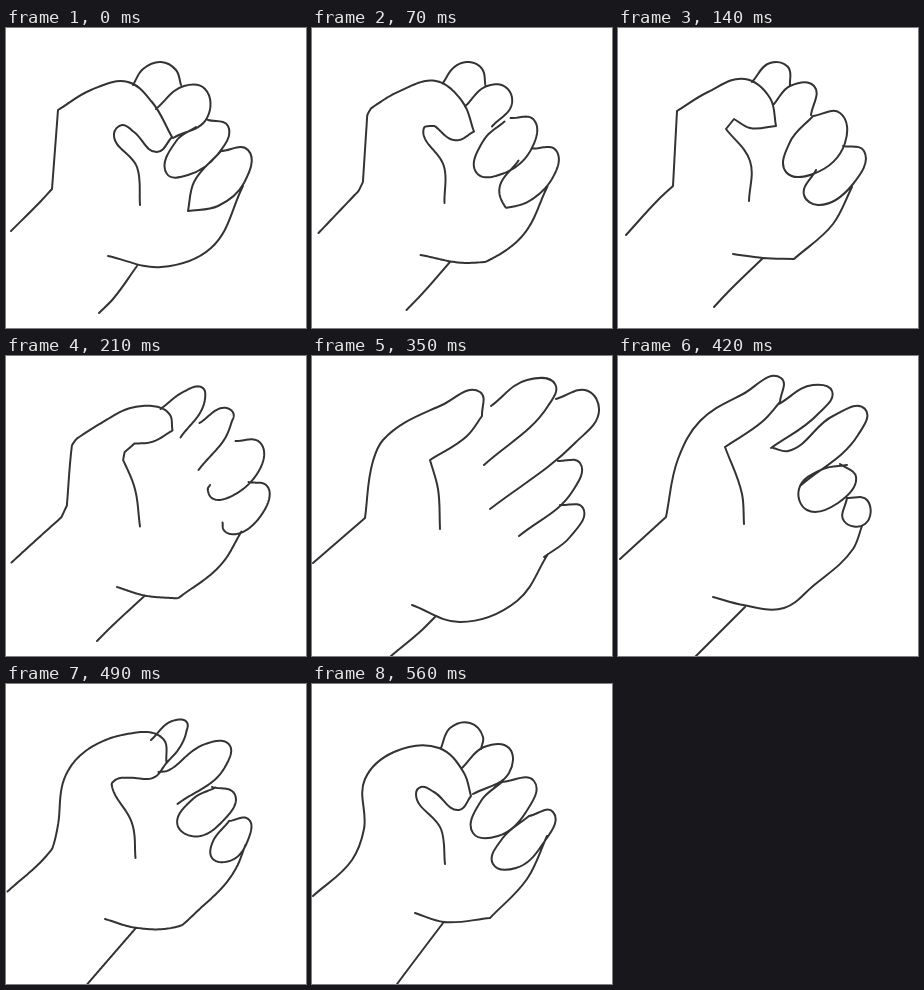
Write an HTML page that moves like this. It is 300 px wide and 300 px high and loops after 630 ms.

```html
<!DOCTYPE html>
<html lang="en">
<head>
<meta charset="utf-8">
<title>Hand closing and opening</title>
<style>
  html, body { margin: 0; height: 100%; overflow: hidden; background: #fff; }
  svg { display: block; width: 100vw; height: 100vh; }
  path { fill: none; stroke: #333; stroke-width: 2; stroke-linecap: round; stroke-linejoin: round; }
</style>
</head>
<body>
<svg viewBox="0 0 300 300"><path id="hand"/></svg>
<script>
const STEP = 70;
const SAMPLES = 120;
const hand = document.getElementById('hand');

// One stroke per line: back of hand and thumb, crease, four fingers, palm, forearm.
// "!" marks a sharp corner.
const fist = `
  5,203 35,173 46,161! 52,82! 85,62 122,54 146,74 166,109
  166,109 151,124 128,104 116,97 108,106 131,139 134,177
  127,57 137,41 155,34 170,42 175,57
  150,81 178,58 199,61 201,90 167,110
  202,92 222,98 212,126 182,147 161,146 171,112 190,99
  215,123 242,122 238,155 212,178 182,183! 188,154 215,123
  102,228 155,239 205,220 237,158
  131,238 107,271 93,285`;

const loosening = `
  8,207 40,172 55,158! 59,83! 90,64 127,51 152,70 158,98
  158,98 132,100 116,91! 108,101! 132,133 131,173
  134,54 152,35 170,39 172,58
  156,76 172,58 196,58 193,87
  195,88 222,85 227,115 195,146 168,144 172,114 195,88
  225,118 246,123 235,156 200,177 186,167 198,142
  115,226 145,230 176,231! 215,196 234,159
  145,230 110,264 96,279`;

const open = `
  3,206 45,174 66,155! 72,100 75,87! 130,52 172,36 175,51
  175,51 160,70 118,98! 121,115 137,168
  175,52 210,31 240,28 238,49 177,105
  231,58 268,42 280,55 264,80 192,141
  264,82 286,89 276,116 213,170
  260,134 279,139 268,174 235,191
  107,236 133,249 168,254! 215,222 237,192
  133,249 100,278 86,291`;

const spread = `
  1,207 53,162! 61,105 71,84 130,49 168,36 170,60
  170,60 155,80 118,104! 126,133 128,173
  179,50 215,24 243,28 236,50 172,109
  244,43 276,35 287,55 263,87 178,153
  246,105 268,107 260,136 207,180
  248,149 271,152 258,181 232,201
  100,249 148,266 205,245 236,198
  123,261 110,274 79,300`;

const curling = `
  2,203 48,161! 60,103 82,65 125,38 163,22 162,46
  162,46 145,65 107,91! 124,138 126,168
  161,48 195,29 214,35 200,58 153,92
  155,92 170,95 215,60 247,53 240,79 182,130
  222,108 238,121 220,147 189,154 181,133 205,113 229,109
  229,142 249,144 247,168 226,165 229,142
  95,241 125,249 166,252 195,230 235,193 244,170
  127,251 95,283 77,301`;

const closing = `
  1,212 40,176 52,145 53,95 82,68 127,64 152,89 159,112
  159,112 147,126 122,108 109,103 104,110 129,145 133,180
  129,64 138,44 158,39 171,53 169,65
  150,84 172,63 197,64 197,89 161,110
  190,98 222,97 214,128 186,152 161,149 169,117 190,98
  217,132 241,128 230,161 204,184 181,180 190,155 217,132
  103,229 132,238 178,234! 215,195 235,152
  131,239 100,280 85,300
  182,104 184,102`;

// Smooth curve through the points; the tangent at each bisects its two neighbouring chords.
function smooth(line) {
  const points = line.trim().split(' ').flatMap(pair => {
    const point = pair.replace('!', '').split(',').map(Number);
    return pair.endsWith('!') ? [point, point] : [point];
  });
  const at = i => points[Math.max(0, Math.min(points.length - 1, i))];
  const span = (a, b) => Math.hypot(b[0] - a[0], b[1] - a[1]);
  const unit = (a, b) => a.map((v, k) => (b[k] - v) / (span(a, b) || 1));
  const tangent = i => {
    const into = unit(at(i - 1), at(i)), out = unit(at(i), at(i + 1));
    return unit([0, 0], into.map((v, k) => v + out[k]));
  };
  let d = 'M' + points[0];
  for (let i = 0; i < points.length - 1; i++) {
    const from = at(i), to = at(i + 1), reach = span(from, to) * 0.36;
    const leave = tangent(i), arrive = tangent(i + 1);
    const c1 = from.map((v, k) => v + leave[k] * reach);
    const c2 = to.map((v, k) => v - arrive[k] * reach);
    d += `C${c1} ${c2} ${to}`;
  }
  return d;
}

const draw = pose => pose.trim().split('\n').map(smooth);

function sample(d) {
  const path = document.createElementNS('http://www.w3.org/2000/svg', 'path');
  path.setAttribute('d', d);
  const length = path.getTotalLength();
  return Array.from({ length: SAMPLES + 1 }, (_, i) => path.getPointAtLength(length * i / SAMPLES));
}

// Drawing halfway between two others, matched along the length of each stroke.
function between(a, b) {
  return a.map((stroke, n) => {
    const other = sample(b[n]);
    return 'M' + sample(stroke).map((p, i) =>
      `${(p.x + other[i].x) / 2},${(p.y + other[i].y) / 2}`).join('L');
  });
}

const [a, b, c, d, e, f] = [fist, loosening, open, spread, curling, closing].map(draw);
const drawings = [a, between(a, b), b, between(b, c), c, d, e, between(e, f), f]
  .map(strokes => strokes.join(''));

const start = performance.now();
function render() {
  const step = Math.floor((performance.now() - start) / STEP) % drawings.length;
  hand.setAttribute('d', drawings[step]);
  requestAnimationFrame(render);
}
render();
</script>
</body>
</html>
```
